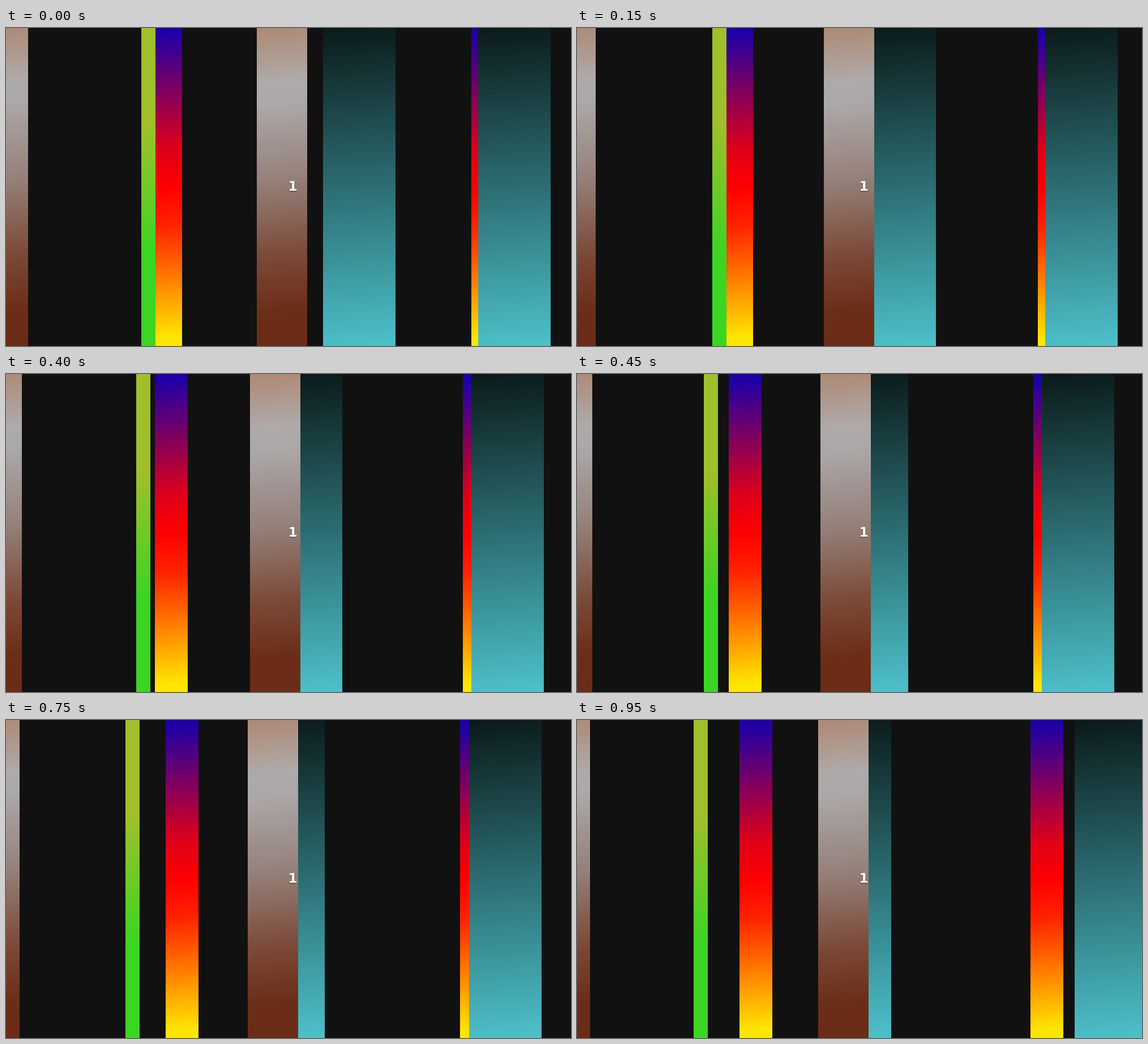
An HTML page that plays this animation: 998 by 561 pixels, repeating every 1.05 s.

```html
<!DOCTYPE html>
<html lang="en">
<head>
<meta charset="utf-8">
<title>Sliding bars</title>
<style>
html, body { margin: 0; width: 100%; height: 100%; overflow: hidden; background: #111; }
.bar { position: absolute; left: 0; top: 0; height: 561px; will-change: transform; }
.teal { width: 128px; background: linear-gradient(175deg, #0b1a1a, #4dc1cb); }
.rainbow { width: 58px; background: linear-gradient(175deg, #1e00a6 2%, #9e0047 26%, #dd0019 38%, #f00 50%, #ff2200 62%, #ff6300 74%, #ffe600 97%); }
.green { width: 25px; background: linear-gradient(175deg, #9fbf2b 31%, #3cd523 70%); }
.brown { width: 89px; background: linear-gradient(175deg, #ae8974, #aeaaaa 17%, #aca8a8 24%, #958079 48%, #7c4a38 71%, #6c2e18 88%, #6a2c16); }
#label {
  position: absolute; left: 406.8px; top: 265px; width: 200px;
  text-align: center; color: #fff; font: bold 23.5px/28px Verdana, "DejaVu Sans", sans-serif;
  text-shadow: 0 1px 2px rgba(0, 0, 0, .5);
}
</style>
</head>
<body>
<div id="label">1</div>
<script>
const LOOP = 1050, TICK = 50;
const DRAG = 0.198;       // speed lost per step
const FIRST_STEP = 1.4;   // the first step is longer than the rest

// Each bar coasts from rest + span to rest; a push at a step sends it further.
// Bottom layer first.
const bars = [
  { type: "rainbow", rest: 254.2, span: -1.2, push: 38.5, at: 3.6 },
  { type: "green", rest: 240.3, span: -1.3, push: -41, at: 3.6 },
  { type: "rainbow", rest: 799.4, span: 22.8 },
  { type: "teal", rest: 815.8, span: 18, push: 189, at: 11 },
  { type: "teal", rest: 417, span: 143.3 },
  { type: "brown", rest: -66.9, span: 17.1 },
  { type: "brown", rest: 424.3, span: 18.7 }
];

const label = document.getElementById("label");
for (const bar of bars) {
  bar.el = document.createElement("div");
  bar.el.className = "bar " + bar.type;
  label.before(bar.el);
}

const fade = steps => Math.exp(-DRAG * Math.max(0, steps));

// Steps last 100 and 50 ms in turn; the rhythm restarts at tick 16
const beat = ticks => ticks - Math.floor((ticks + 2) / 3);
function stepAt(t) {
  const tick = Math.floor(t / TICK);
  return tick < 16 ? beat(tick) : 11 + beat(tick - 16);
}

function draw(t) {
  const step = stepAt(t);
  const age = step && step - 1 + FIRST_STEP;
  for (const { el, rest, span, push = 0, at = 0 } of bars) {
    const x = rest + span * fade(age) + push * (1 - fade(step - at));
    el.style.transform = `translateX(${x.toFixed(2)}px)`;
  }
}

const start = performance.now();
function tick() {
  draw((performance.now() - start) % LOOP);
  requestAnimationFrame(tick);
}
tick();
</script>
</body>
</html>
```
